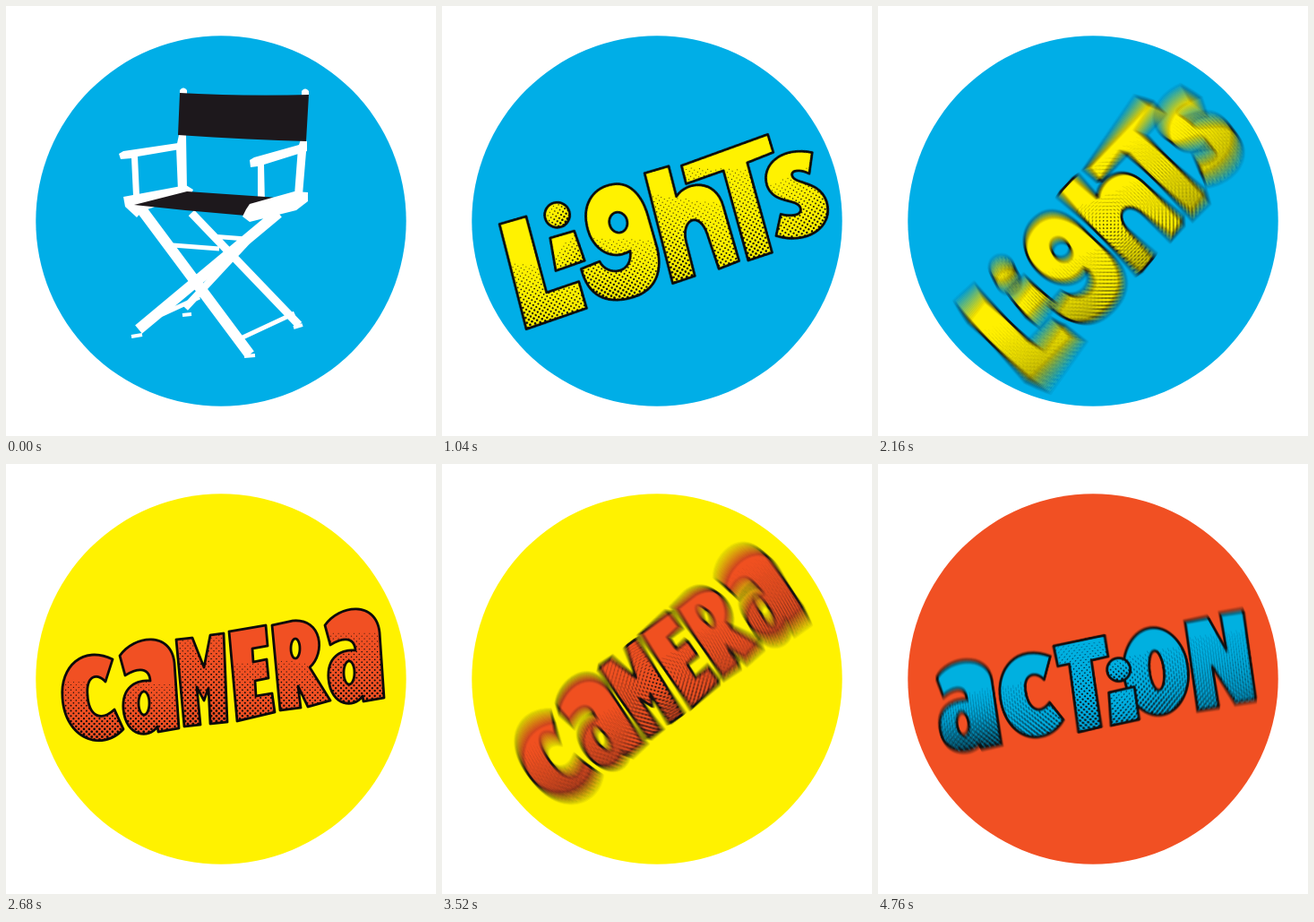
Write an HTML page with a canvas that moves like this. It is 480x480 px and loops after 4800 ms.

```html
<!DOCTYPE html>
<html lang="en">
<head>
<meta charset="utf-8">
<title>Lights, camera, action</title>
<style>
html, body { margin: 0; width: 100%; height: 100%; overflow: hidden; background: #fff; }
canvas { display: block; width: 480px; height: 480px; }
</style>
</head>
<body>
<canvas id="stage" width="480" height="480"></canvas>
<script>
const SIZE = 480, LOOP = 4800, STEP = 40, SHUTTER = 20, SAMPLES = 16;
const BLUE = '#00aee7', YELLOW = '#fff200', ORANGE = '#f15023', INK = '#0b0a0a', CLOTH = '#1d181c';

const ellipse = (x, y, rx, ry) =>
  `M${x - rx} ${y}a${rx} ${ry} 0 1 0 ${2 * rx} 0a${rx} ${ry} 0 1 0 ${-2 * rx} 0Z`;
// shade: the line along which the halftone grows, x0 y0 x1 y1
const glyph = (path, ...shade) => ({ path, shade });

const cameraA = 'M127 214C143 191 184 186 188 222L193 295L170 299L169 293C160 307 134 305 131 274' +
  'C129 249 145 241 161 242C160 227 147 227 133 236Z' + ellipse(154, 267, 6, 13);

const lights = [
  glyph('M70 196L101 195L102 283L140 280L141 311L70 317Z', 110, 238, 80, 330),
  glyph(ellipse(135, 202, 14, 14), 126, 190, 144, 214),
  glyph('M121 225L149 224L152 259L118 262Z', 128, 232, 152, 268),
  glyph('M146 267L168 264C172 283 201 287 204 261C182 268 164 250 164 225C164 198 180 184 200 184' +
    'C222 184 233 203 233 232L234 266C233 298 216 312 191 312C163 312 146 298 146 267Z' +
    ellipse(199, 227, 10, 11.5), 214, 236, 188, 324),
  glyph('M241 181L269 180L269 215C284 201 316 206 317 238L319 302L295 305L292 264' +
    'C290 237 268 240 267 266L267 306L241 308Z', 290, 205, 244, 318),
  glyph('M283 183L385 173L386 194L355 198L357 302L329 304L327 200L283 204Z', 362, 185, 322, 325),
  glyph('M428 205C398 190 369 203 370 228C372 251 400 250 400 262C400 270 388 269 377 263L366 285' +
    'C395 303 431 293 430 262C428 237 401 235 400 225C399 218 410 219 419 227Z', 390, 208, 412, 318)
];

const camera = [
  glyph('M119 218C86 202 60 226 63 261C66 307 107 322 131 296L121 274C105 289 92 280 91 258' +
    'C89 237 101 232 111 243Z', 98, 232, 92, 314),
  glyph(cameraA, 164, 232, 157, 312),
  glyph('M190 196L208 194L221 227L228 191L243 189L247 288L228 290L226 250L221 264L213 249L217 291L199 293Z',
    204, 172, 226, 300),
  glyph('M249 187L290 180L292 203L275 206L276 221L291 218L293 239L278 242L279 259L297 256L300 277L258 287Z',
    271, 206, 275, 305),
  glyph('M297 180L320 175C353 172 357 211 339 227L362 264L337 271L326 248L329 272L306 275Z' +
    ellipse(323, 206, 5, 11), 322, 206, 306, 300),
  glyph(cameraA, 160, 205, 161, 322)
];
camera[5].shift = [229, -34];

const action = [
  glyph('M67 218C80 197 126 195 128 227L130 300L107 302L106 296C97 307 65 306 64 276' +
    'C63 252 80 244 98 246C98 229 84 231 72 239Z' + ellipse(90, 272, 6.5, 13), 96, 231, 100, 285),
  glyph('M196 209C160 190 133 216 135 251C138 300 181 309 202 281L189 260C176 274 164 264 164 244' +
    'C163 226 177 222 186 234Z', 168, 222, 170, 306),
  glyph('M201 198L259 193L260 217L241 219L243 294L217 297L216 220L203 221Z', 230, 180, 233, 308),
  glyph(ellipse(311, 240, 36, 49) + ellipse(312, 239, 8, 22), 313, 204, 318, 290),
  glyph(ellipse(270, 233, 13, 13), 268, 218, 273, 248),
  glyph('M256 257L285 254L286 291L254 294Z', 270, 245, 271, 300),
  glyph('M350 189L376 187L392 226L390 185L416 184L418 285L395 286L374 242L376 288L352 289Z',
    382, 192, 386, 296)
];

function makeSprite(draw) {
  const sprite = document.createElement('canvas');
  sprite.width = sprite.height = SIZE * 2;
  const c = sprite.getContext('2d');
  c.scale(2, 2);
  draw(c);
  return sprite;
}

function halftone(c, [x0, y0, x1, y1]) {
  const dx = x1 - x0, dy = y1 - y0, pitch = 2.9;
  c.fillStyle = INK;
  c.beginPath();
  for (let row = 0; row * pitch < SIZE; row++) {
    for (let col = row % 2; col * pitch < SIZE; col += 2) {
      const x = col * pitch, y = row * pitch;
      const k = ((x - x0) * dx + (y - y0) * dy) / (dx * dx + dy * dy);
      if (k < 0.15) continue;
      const r = 0.3 + 1.25 * Math.min(k, 1.4);
      c.moveTo(x + r, y);
      c.arc(x, y, r, 0, 7);
    }
  }
  c.fill();
}

const wordSprite = (glyphs, color) => makeSprite(c => {
  c.lineJoin = 'round';
  c.lineWidth = 2.8;
  for (const { path, shade, shift = [0, 0] } of glyphs) {
    const shape = new Path2D(path);
    c.save();
    c.translate(...shift);
    c.fillStyle = color;
    c.fill(shape, 'evenodd');
    c.save();
    c.clip(shape, 'evenodd');
    halftone(c, shade);
    c.restore();
    c.strokeStyle = INK;
    c.stroke(shape);
    c.restore();
  }
});

const chairSprite = () => makeSprite(c => {
  const fill = (color, d) => { c.fillStyle = color; c.fill(new Path2D(d)); };
  const bar = (width, d) => { c.lineWidth = width; c.stroke(new Path2D(d)); };
  c.strokeStyle = '#fff';
  c.lineJoin = 'round';
  // legs and rungs
  bar(8, 'M292 238L200 337');
  bar(9, 'M207 231L327 356');
  bar(5, 'M186 267L238 271M229 257L268 260M166 348L216 325M262 371L322 343');
  bar(12, 'M152 228L272 389M304 231L148 361');
  bar(4, 'M140 369L152 367M266 391L278 390M321 359L331 356M197 345L207 344');
  // back posts and arms
  fill('#fff', 'M194 100V94Q198 89 202 94V100ZM330 101V95Q334 90 338 95V101Z');
  fill('#fff', 'M193 144H201L202 205L192 207L190 158ZM329 149L336 151L331 211L322 211L326 158Z');
  fill('#fff', 'M126 165L131 162L192 153L200 148V159L147 168L149 211L142 212L140 170L128 171Z');
  fill('#fff', 'M272 172L277 169L327 155L336 151V162L288 177L289 221L281 223V179L273 180Z');
  // seat
  fill('#fff', 'M131 213L201 200L209 205L206 211L152 229L146 236L133 224Z');
  fill(CLOTH, 'M143 222L202 207L304 214L268 234L200 228Z');
  fill('#fff', 'M268 227L272 221L322 207L337 208V218L324 228L272 241L264 235Z');
  fill(CLOTH, 'M194 97Q265 101 338 99L335 151Q265 149 192 144Z');
});

// Each scene drifts slowly, passes its rest pose at `rest`, and whirls round once from `spin`.
const DRIFT = 0.0199;
const scenes = [
  { from: 0, spin: 540, rest: 0, drift: 0, pivot: [239, 241], back: BLUE, sprite: chairSprite() },
  { from: 1040, spin: 1860, rest: 1760, drift: DRIFT, pivot: [256, 243], back: BLUE, sprite: wordSprite(lights, YELLOW) },
  { from: 2320, spin: 3204, rest: 2680, drift: DRIFT, pivot: [241, 241], back: YELLOW, sprite: wordSprite(camera, ORANGE) },
  { from: 3600, spin: 4304, rest: 4280, drift: DRIFT, pivot: [241, 242], back: ORANGE, sprite: wordSprite(action, BLUE) }
];

function angleAt(scene, t) {
  const since = Math.max(0, t - scene.spin);
  const p = Math.pow(since / 169, 3.06);
  return scene.drift * (t - scene.rest) + 360 * p / (1 + p);
}

const ctx = document.getElementById('stage').getContext('2d');
const layer = document.createElement('canvas');
layer.width = layer.height = SIZE;
const blur = layer.getContext('2d');
blur.imageSmoothingQuality = ctx.imageSmoothingQuality = 'high';

function drawSprite(c, { sprite, pivot: [x, y] }, degrees) {
  c.save();
  c.translate(x, y);
  c.rotate(degrees * Math.PI / 180);
  c.drawImage(sprite, -x, -y, SIZE, SIZE);
  c.restore();
}

function drawBlurred(scene, t) {
  blur.clearRect(0, 0, SIZE, SIZE);
  blur.globalCompositeOperation = 'lighter';
  blur.globalAlpha = 1 / SAMPLES;
  for (let i = 0; i < SAMPLES; i++) {
    const offset = SHUTTER * ((i + 0.5) / SAMPLES - 0.5);
    drawSprite(blur, scene, angleAt(scene, t + offset));
  }
  ctx.drawImage(layer, 0, 0);
}

function render(t) {
  const scene = scenes.filter(s => s.from <= t).pop();
  ctx.fillStyle = '#fff';
  ctx.fillRect(0, 0, SIZE, SIZE);
  ctx.fillStyle = scene.back;
  ctx.beginPath();
  ctx.arc(240, 240, 206.7, 0, 7);
  ctx.fill();
  if (t + SHUTTER / 2 > scene.spin) drawBlurred(scene, t);
  else drawSprite(ctx, scene, angleAt(scene, t));
}

const begin = performance.now();
function tick() {
  const t = (performance.now() - begin) % LOOP;
  render(Math.floor(t / STEP) * STEP);
  requestAnimationFrame(tick);
}
tick();
</script>
</body>
</html>
```
